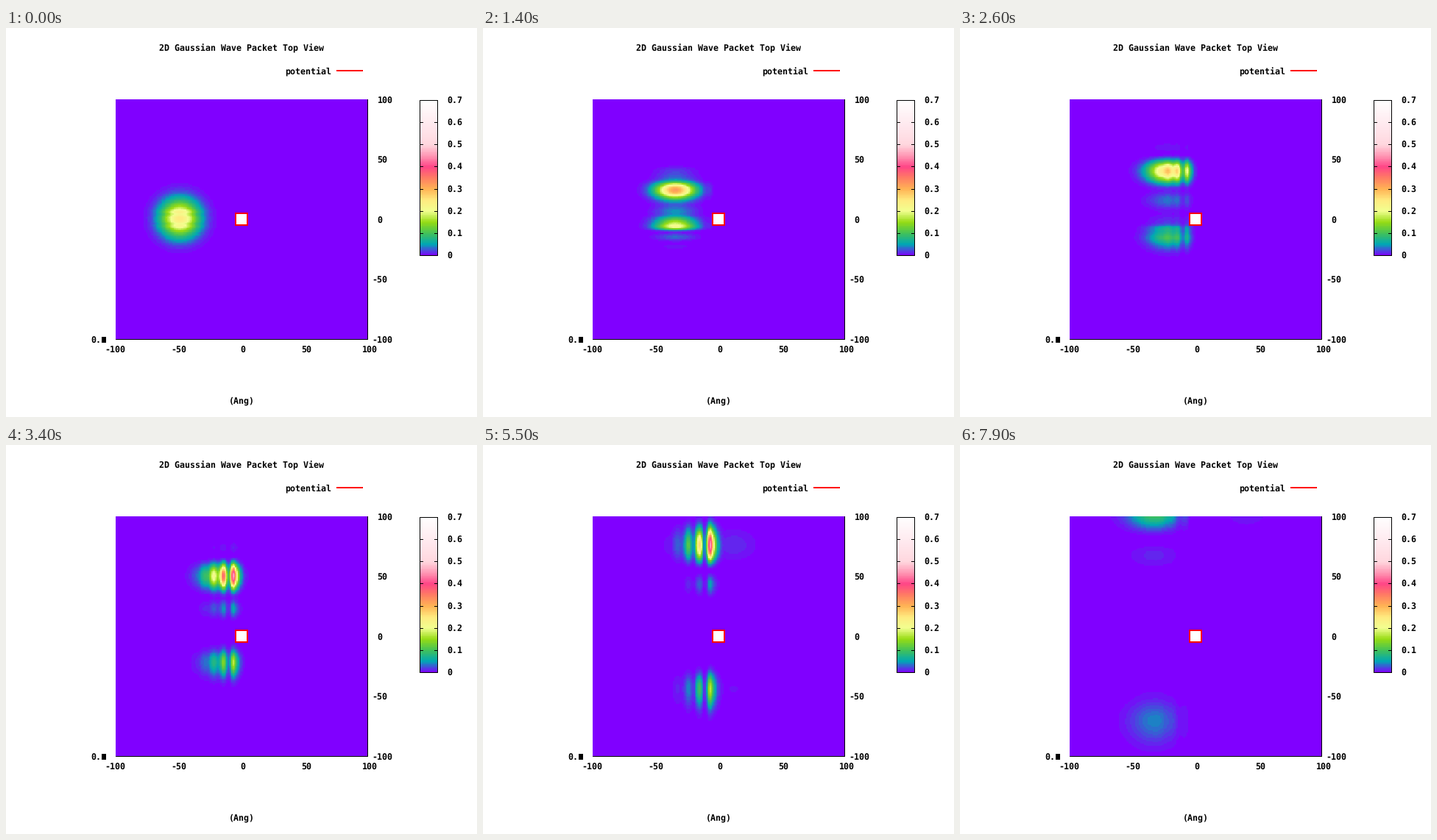
A matplotlib script for the animation above (8000 ms loop, 640 by 529 pixels).

```python
import numpy as np
import matplotlib as mpl
import matplotlib.pyplot as plt
from matplotlib.animation import FuncAnimation
from matplotlib.colors import LinearSegmentedColormap
from matplotlib.patches import Rectangle

W, H, DPI = 640, 529, 100
FRAMES, INTERVAL = 80, 100
VMAX = 0.7
LEFT, RIGHT, TOP, BOTTOM = 149, 491, 97, 424

mpl.rcParams["toolbar"] = "None"
mpl.rcParams["text.hinting"] = "none"

# Physics in eV, angstrom and femtoseconds
HBAR, KIN = 0.6582, 3.81
ENERGY, BARRIER, SIGMA = 0.53, 0.7, 15 / np.sqrt(2)
PEAK = 0.25
FRAME_TIME, SUBSTEPS = 0.25, 25

STOPS = [
    (0.00, "#8000ff"), (0.05, "#00a8b4"), (0.10, "#42c25a"),
    (0.15, "#96dc14"), (0.20, "#f2ff90"), (0.25, "#ffeb80"),
    (0.30, "#ffb455"), (0.35, "#ff7d64"), (0.40, "#ff4687"),
    (0.45, "#ff96b4"), (0.50, "#ffd7de"), (0.60, "#ffebf0"),
    (0.70, "#ffffff"),
]
CMAP = LinearSegmentedColormap.from_list(
    "density", [(v / VMAX, c) for v, c in STOPS], N=128)


def evolve():
    """Split-step solution of both axes: cell densities [frame, axis, cell]."""
    n = 1024
    s = np.arange(n) - n // 2
    k = 2 * np.pi * np.fft.fftfreq(n)
    dt = FRAME_TIME / SUBSTEPS
    wall = BARRIER * np.where(abs(s) < 5, 1.0, np.where(abs(s) == 5, 0.5, 0.0))
    half_v = np.exp(-0.5j * wall * dt / HBAR)
    # Dispersion of a three-point Laplacian on a unit grid
    kinetic = np.exp(-2j * KIN * (1 - np.cos(k)) * dt / HBAR)

    start = np.array([[-50.0], [0.0]])
    k0 = np.sqrt(ENERGY / KIN)
    psi = np.exp(-(s - start)**2 / (4 * SIGMA**2) + 1j * k0 * (s - start))

    nodes = abs(s) <= 100
    out = []
    for _ in range(FRAMES):
        for _ in range(SUBSTEPS):
            psi = half_v * np.fft.ifft(kinetic * np.fft.fft(half_v * psi))
        rho = abs(psi[:, nodes])**2
        out.append((rho[:, 1:] + rho[:, :-1]) / 2)
    return np.array(out)


density = evolve()


def field(i):
    along_x, along_y = density[i]
    return PEAK * np.outer(along_y, along_x)


fig = plt.figure(figsize=(W / DPI, H / DPI), dpi=DPI, facecolor="white")
ax = fig.add_axes([0, 0, 1, 1])
ax.axis("off")


def px(n):
    return n * 72 / DPI


def label(x, y, text, ha="left"):
    ax.text(x, y + 4.4, text, ha=ha, va="baseline", color="black",
            family="DejaVu Sans Mono", weight="bold", size=px(7 / 0.602))


def box(x, y, w, h, color="black"):
    ax.add_patch(Rectangle((x, y), w, h, fc=color, ec="none", lw=0,
                           antialiased=False, zorder=3))


def picture(data, left, right, bottom, top):
    return ax.imshow(data, extent=(left, right, bottom, top), origin="lower",
                     cmap=CMAP, vmin=0, vmax=VMAX, aspect="auto",
                     interpolation="nearest")


plot = picture(field(0), LEFT, RIGHT, BOTTOM, TOP)
box(LEFT, BOTTOM - 1, RIGHT - LEFT + 1, 1)
box(RIGHT, TOP, 1, BOTTOM - TOP)

# Potential square
box(311, 251, 18, 18, "red")
box(313, 253, 14, 14, "white")

# Color bar
picture(np.linspace(0, VMAX, 128)[:, None], 562, 587, 310, 98)
for x in (562, 586):
    box(x, 98, 1, 212)
for y in (98, 309):
    box(562, y, 25, 1)
for i in range(8):
    y = round(309 - i * 211 / 7)
    box(562, y, 5, 1)
    box(582, y, 5, 1)
    label(599.5, y + 0.5, f"{i / 10:g}")

# Titles, key and axis labels
label(320, 27.5, "2D Gaussian Wave Packet Top View", "center")
label(379, 59, "potential")
box(449, 57, 36, 2, "red")
label(320, 506.5, "(Ang)", "center")
for i, v in enumerate((-100, -50, 0, 50, 100)):
    label(148.5 + 86.4 * i, 437, str(v), "center")
    label(497.5 if v < 0 else 504.5, 424 - 81.5 * i, str(v))
label(115.5, 424, "0.")
box(130, 420, 6, 8)

ax.set_xlim(0, W)
ax.set_ylim(H, 0)


def update(i):
    plot.set_data(field(i))
    return (plot,)


anim = FuncAnimation(fig, update, frames=FRAMES, interval=INTERVAL,
                     repeat=True, repeat_delay=0)
plt.show()
```
